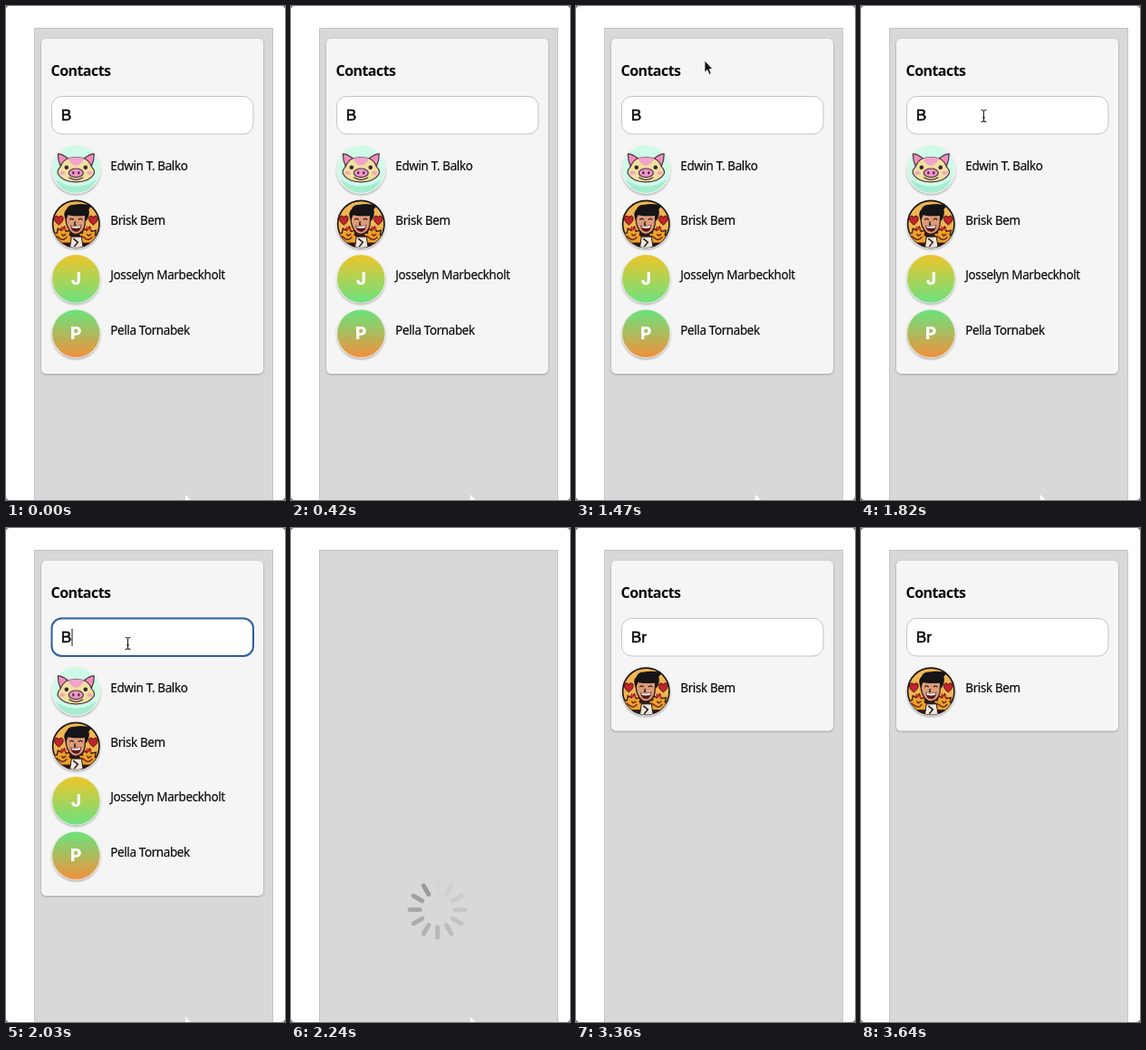
An HTML page for the animation above (3850 ms loop, 308 px wide and 544 px high).

```html
<!DOCTYPE html>
<html lang="en">
<head>
<meta charset="utf-8">
<title>Contact search</title>
<style>
html, body { margin: 0; width: 100%; height: 100%; overflow: hidden; background: #fff; }
svg { display: block; width: 308px; height: 544px; }
text { fill: #080808; }
.title { font: 600 16px "Noto Sans", sans-serif; letter-spacing: -.55px; }
.name { font: 13.5px "Noto Sans", sans-serif; letter-spacing: -.4px; stroke: #080808; stroke-width: .15px; }
.query { font: 17.3px "Liberation Sans", Arial, sans-serif; stroke: #080808; stroke-width: .5px; }
.initial { font: 800 19px Inter, sans-serif; fill: #fff; text-anchor: middle; }
</style>
</head>
<body>
<svg viewBox="0 0 308 544">
  <defs>
    <linearGradient id="sunrise" x2="0" y2="1">
      <stop offset=".05" stop-color="#e8c62f"/><stop offset=".95" stop-color="#72e07b"/>
    </linearGradient>
    <linearGradient id="sunset" x2="0" y2="1">
      <stop offset=".05" stop-color="#70e07a"/><stop offset=".95" stop-color="#eb9440"/>
    </linearGradient>
    <filter id="soft" x="-20%" y="-20%" width="140%" height="140%"><feGaussianBlur stdDeviation="1.1"/></filter>
    <clipPath id="disc"><circle r="25.8"/></clipPath>
    <path id="heart" d="M0 5C-7 0-5-5-2.5-5Q-.5-5 0-2.8Q.5-5 2.5-5C5-5 7 0 0 5Z" fill="#c4242c" stroke="#4a1212"/>

    <g id="bird">
      <path d="M-8 9L-11 4L-9 2L-12-2L-7-2L-6-7L-2-5L1-9L3-4L8-5L7 0L11 3L8 9Z" fill="#eda02c" stroke="#3a1a0c" stroke-width="1.4"/>
      <path d="M-4-6L-2-10L0-7L3-9L3-5" fill="#d0352a"/>
      <path d="M-5 3Q0 8 4 2M-2-1l2 2l3-2M-8 1l3 2" fill="none" stroke="#6b2a10" stroke-width="1.5"/>
    </g>

    <g id="pig">
      <circle r="26.3" fill="#cffae8"/>
      <path d="M-23 11Q0 27 23 11Q15 26 0 26Q-15 26-23 11Z" fill="#a5ecd0"/>
      <g stroke="#4d3140" stroke-width="1.2" stroke-linejoin="round">
        <path d="M-9-12Q-15-17-20-17Q-20-10-17-3Z" fill="#f08fbd"/>
        <path d="M9-12Q15-17 20-17Q20-10 17-3Z" fill="#f08fbd"/>
        <path d="M-9-12Q0-14 9-12Q15-9 17-3Q21 1 20 5Q15 14 0 14Q-15 14-20 5Q-21 1-17-3Q-15-9-9-12Z" fill="#efe0a0"/>
        <path d="M-9-12Q0-14 9-12Q6-5 0-4Q-6-5-9-12Z" fill="#f2a2cb" stroke="none"/>
        <ellipse cy="4" rx="8" ry="4.8" fill="#ee96c8"/>
        <path d="M-8 9Q0 14 8 9" fill="none"/>
      </g>
      <ellipse cx="-15" cy="4" rx="3" ry="2" fill="#f3a6bd"/><ellipse cx="15" cy="4" rx="3" ry="2" fill="#f3a6bd"/>
      <g fill="#3c2531">
        <circle cx="-10.5" cy="-2" r="2.3"/><circle cx="10.5" cy="-2" r="2.3"/>
        <ellipse cx="-3" cy="4" rx="1.1" ry="1.7"/><ellipse cx="3" cy="4" rx="1.1" ry="1.7"/>
      </g>
    </g>

    <g id="grin">
      <circle r="25.7" fill="#f0b552" stroke="#171313" stroke-width="1.6"/>
      <g clip-path="url(#disc)">
        <path d="M-24 27Q-25 12-13 10Q0 6 13 10Q25 12 24 27Z" fill="#2c1a16"/>
        <use href="#bird" x="-14" y="12"/><use href="#bird" x="14" y="12"/>
        <path d="M-7 27L-5 14L6 14L8 27Z" fill="#eee5dc" stroke="#241716"/>
        <path d="M-3 16L2 20L-2 25" fill="none" stroke="#241716" stroke-width="1.5"/>
        <g transform="translate(0 -2) scale(.88)" stroke-linejoin="round">
          <path d="M-11-11Q-14-3-11 5Q-7 15 0 15Q9 14 11 4L12-10Z" fill="#dc9c79" stroke="#241716" stroke-width="1.4"/>
          <path d="M-13-2Q-17-12-12-16Q-10-22-2-22Q9-24 20-21L16-16Q18-10 13-1L11-8Q0-7-10-9Z" fill="#151416"/>
          <path d="M-8-3q2.5-3 5 0M3-3q2.5-3 5 0M-1-1l-1 4h2" fill="none" stroke="#241716" stroke-width="1.5"/>
          <path d="M-7 4Q0 6 7 3Q6 12 0 12Q-6 12-7 4Z" fill="#5b1719"/>
          <path d="M-6 4.6Q0 6.4 6 4L5 7Q0 8-5 7Z" fill="#fff"/>
        </g>
        <use href="#heart" x="-19" y="-4"/><use href="#heart" x="19" y="-4"/>
      </g>
    </g>
    <g id="jay"><circle r="26.3" fill="url(#sunrise)"/><text class="initial" y="6.3">J</text></g>
    <g id="pea"><circle r="26.3" fill="url(#sunset)"/><text class="initial" y="6.3">P</text></g>
  </defs>

  <path d="M0 0H4Q0 0 0 4ZM308 0V4Q308 0 304 0ZM0 544V540Q0 544 4 544ZM308 544H304Q308 544 308 540Z" fill="#666"/>
  <rect x="31.5" y="24.5" width="263" height="530" fill="#d8d8d8" stroke="#c5c5c5"/>
  <path id="tip" d="M198 538V544H203.5Z" fill="#fff"/>

  <g id="card">
    <rect id="shade" x="39" y="36.8" width="245" rx="5" fill="#000" opacity=".3" filter="url(#soft)"/>
    <rect id="sheet" x="39" y="36" width="245" rx="5" fill="#f5f5f5"/>
    <text class="title" x="49.5" y="77">Contacts</text>
    <rect id="field" x="50.5" y="99.5" width="222.5" height="41.5" rx="11" fill="#fff"/>
    <text id="query" class="query" x="60.7" y="125.8"></text>
    <path id="caret" d="M73 111V130" stroke="#111"/>
    <g id="rows"></g>
  </g>
  <g id="spinner" transform="translate(161.7 420.3)" stroke="#6e6e6e" stroke-width="5" stroke-linecap="round"></g>
  <path id="arrow" d="M0 0V13.2L3 10.4L5 15.4L7.3 14.4L5.2 9.6H9Z" fill="#111" stroke="#fff" stroke-width=".8"/>
  <path id="beam" d="M-3-6.5Q0-6.5 0-5Q0-6.5 3-6.5M0-5V5M-3 6.5Q0 6.5 0 5Q0 6.5 3 6.5M-1.5 2H1.5" fill="none" stroke="#222" stroke-width="1.1"/>
</svg>
<script>
const LOOP = 3850, TICK = 210;
const LOAD = 2240, RESULT = 3290, FOCUS = 2030;
const people = [
  ["Edwin T. Balko", "pig"],
  ["Brisk Bem", "grin"],
  ["Josselyn Marbeckholt", "jay"],
  ["Pella Tornabek", "pea"]
];
const path = [
  { at: 1400, x: 142, y: 60, shape: "arrow" },
  { at: 1610, x: 139, y: 87, shape: "arrow" },
  { at: 1820, x: 135.5, y: 121, shape: "beam" },
  { at: FOCUS, x: 134.5, y: 127, shape: "beam" }
];

const $ = id => document.getElementById(id);
const show = (id, on) => $(id).setAttribute("visibility", on ? "visible" : "hidden");
const set = (id, attrs) => {
  for (const key in attrs) $(id).setAttribute(key, attrs[key]);
};

$("spinner").innerHTML = Array.from({ length: 12 }, (_, i) =>
  `<path d="M0-19.5V-30.5" transform="rotate(${i * 30})"/>`).join("");
const bars = [...$("spinner").children];

const row = ([name, face], i) => `
  <g transform="translate(77.3 ${179.8 + i * 60.3})">
    <circle cy="1.5" r="27" fill="#000" opacity=".3" filter="url(#soft)"/>
    <circle r="27.2" fill="#f3f3f1"/>
    <use href="#${face}"/>
    <text class="name" x="38" y="1">${name}</text>
  </g>`;

let shown;
function fill(query) {
  if (query === shown) return;
  shown = query;
  const found = people.filter(([name]) => name.toLowerCase().includes(query.toLowerCase()));
  const height = 127 + found.length * 60.5;
  $("query").textContent = query;
  $("rows").innerHTML = found.map(row).join("");
  set("shade", { height });
  set("sheet", { height });
}

function render(t) {
  const loading = t >= LOAD && t < RESULT;
  const focused = t >= FOCUS && t < LOAD;

  fill(t < RESULT ? "B" : "Br");
  $("card").style.display = loading ? "none" : "";
  set("field", { stroke: focused ? "#2b5da3" : "#c4c4c4", "stroke-width": focused ? 2 : 1 });
  show("caret", focused);
  show("tip", t < 2660);

  const point = t < LOAD ? path.filter(p => p.at <= t).pop() : null;
  for (const shape of ["arrow", "beam"]) show(shape, point && point.shape === shape);
  if (point) set(point.shape, { transform: `translate(${point.x} ${point.y})` });

  // The lead bar advances seven places in three ticks.
  show("spinner", loading);
  const lead = 11 + Math.floor(Math.floor((t - LOAD) / TICK) * 7 / 3);
  if (loading) bars.forEach((bar, i) => {
    const age = (lead - i + 24) % 12;
    bar.setAttribute("opacity", 0.03 + 0.54 * (1 - age / 11) ** 1.15);
  });
}

const start = performance.now();
function frame() {
  render((performance.now() - start) % LOOP);
  requestAnimationFrame(frame);
}
frame();
</script>
</body>
</html>
```
